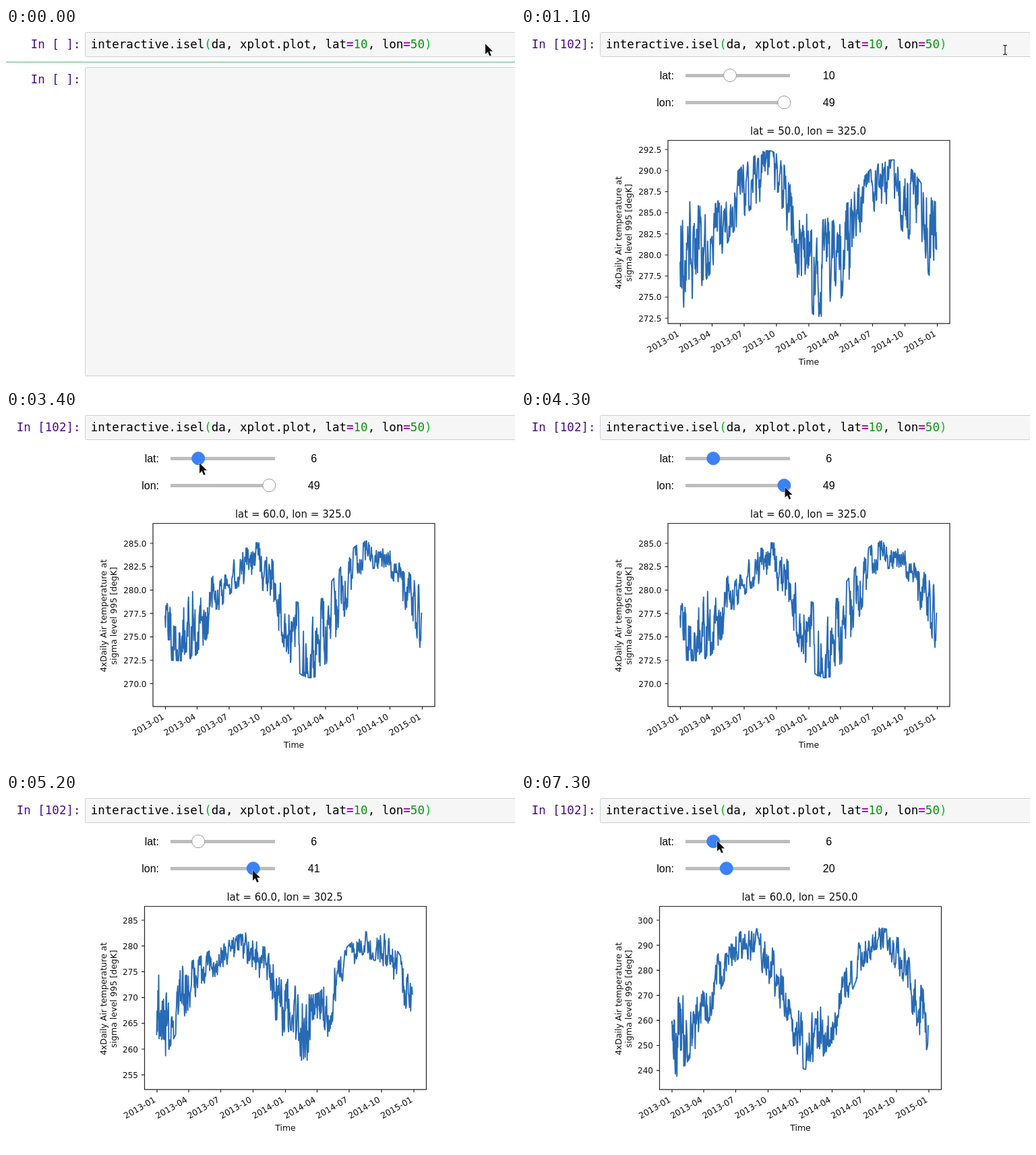
An HTML page that plays this animation: 755x526 px, repeating every 8000 ms.

```html
<!DOCTYPE html>
<html lang="en">
<head>
<meta charset="utf-8">
<title>Interactive plot</title>
<style>
  html, body { margin: 0; width: 100%; height: 100%; overflow: hidden; background: #fff; }
  svg { display: block; }
  text { font: 12.5px "DejaVu Sans", sans-serif; fill: #111; }
  .code text { font: 17.5px "DejaVu Sans Mono", monospace; fill: #000; }
  .code .prompt { fill: #480a8c; }
  .br { fill: #0b2; }
  .op { fill: #a814c8; font-weight: bold; }
  .num { fill: #0a940f; }
  .cell { fill: #f6f6f6; stroke: #cfcfcf; }
  .slider text { font: 16px "Liberation Sans", Arial, sans-serif; fill: #000; }
  .plot text.title { font-size: 15px; }
  .plot text.tick { font-size: 12px; }
  .axes { fill: none; stroke: #222; stroke-width: 1.2; }
  .data { fill: none; stroke: #276ab5; stroke-width: 1.9; stroke-linejoin: round; }
  .end { text-anchor: end; }
  .mid { text-anchor: middle; }
</style>
</head>
<body>
<svg width="755" height="526" viewBox="0 0 755 526">
  <g class="code">
    <rect class="cell" x="117.5" y="6.5" width="660" height="36" rx="2"/>
    <text id="prompt" class="prompt end" x="110.5" y="30"></text>
    <text x="125.7" y="30">interactive.isel<tspan class="br">(</tspan>da, xplot.plot, lat<tspan class="op">=</tspan><tspan class="num">10</tspan>, lon<tspan class="op">=</tspan><tspan class="num">50</tspan><tspan class="br">)</tspan></text>
    <path id="caret" d="M631.5 14V34" stroke="#000"/>
    <g id="next">
      <path d="M0 50.5H755" stroke="#4fb873"/>
      <rect class="cell" x="117.5" y="58.5" width="660" height="457" rx="2"/>
      <text class="prompt end" x="110.5" y="82">In [ ]:</text>
    </g>
  </g>
  <g id="plots"></g>
  <g id="sliders"></g>
  <path id="beam" d="M715 25.5h2l1 1 1-1h2M718 26V39M715 39.5h2l1-1 1 1h2" fill="none" stroke="#222" stroke-width="1.2"/>
  <path id="arrow" d="M0 0V15.2L3.6 12L6.2 18L8.8 16.9L6.3 11.1H11Z" fill="#111" stroke="#fff" paint-order="stroke"/>
</svg>
<script>
const $ = id => document.getElementById(id);
const show = (el, on) => el.style.display = on ? '' : 'none';
const clamp = (v, lo, hi) => Math.max(lo, Math.min(hi, v));
const WIDTH = 381, TOP = 166.5, BOTTOM = 437.8, DAYS = 730;

function seeded(seed) {
  return () => {
    seed = (seed * 1664525 + 1013904223) % 4294967296;
    return seed / 4294967296;
  };
}

// Catmull-Rom curve through evenly spaced values, k from 0 to 1
function curve(values, k) {
  const last = values.length - 1, s = k * last;
  const i = Math.min(last - 1, Math.floor(s)), u = s - i;
  const [a, b, c, d] = [-1, 0, 1, 2].map(o => values[clamp(i + o, 0, last)]);
  return b + u / 2 * (c - a + u * (2 * a - 5 * b + 4 * c - d + u * (3 * (b - c) + d - a)));
}

// Drifting noise between an upper and a lower quarterly curve
function series(x0, hi, lo, seed) {
  const rnd = seeded(seed), points = [];
  let drift = 0;
  for (let x = 0; x <= WIDTH; x += .6) {
    const a = curve(hi, x / WIDTH), b = curve(lo, x / WIDTH);
    drift = drift * .8 + (rnd() - .5) * 1.6;
    const u = clamp(drift * .9 + Math.sin(rnd() * 2 * Math.PI) * .5, -1.1, 1.1);
    points.push(`${(x0 + x).toFixed(1)} ${((a + b + (b - a) * u) / 2).toFixed(1)}`);
  }
  return 'M' + points.join('L');
}

// ticks: first value, value step, first y, y step, count, decimals
function addPlot(left, title, ticks, hi, lo) {
  const [value, dv, y0, dy, count, digits] = ticks;
  const x0 = left + 18, centre = left + 209;
  let marks = '', labels = '';
  for (let i = 0; i < count; i++) {
    const y = y0 + i * dy;
    marks += `M${left} ${y}h-4.5`;
    labels += `<text class="tick end" x="${left - 9.5}" y="${y + 4.6}">${(value - i * dv).toFixed(digits)}</text>`;
  }
  for (let i = 0; i < 9; i++) {
    const date = new Date(Date.UTC(2013, i * 3));
    const x = x0 + (date - Date.UTC(2013)) / 864e5 / DAYS * WIDTH;
    marks += `M${x + .5} ${BOTTOM}v4.5`;
    labels += `<text class="end" transform="translate(${x - .5} 455.5) rotate(-30)">${date.toISOString().slice(0, 7)}</text>`;
  }
  $('plots').insertAdjacentHTML('beforeend', `<g class="plot">
    <path class="data" d="${series(x0, hi, lo, left + value)}"/>
    <path class="axes" d="M${left} ${TOP}h418V${BOTTOM}h-418Z${marks}"/>${labels}
    <text class="title mid" x="${centre - 1}" y="158.3">${title}</text>
    <text class="mid" x="${centre}" y="498.5">Time</text>
    <text class="mid" transform="translate(149 303.5) rotate(-90)">4xDaily Air temperature at</text>
    <text class="mid" transform="translate(164 303.5) rotate(-90)">sigma level 995 [degK]</text></g>`);
}

addPlot(218, 'lat = 50.0, lon = 325.0', [292.5, 2.5, 180, 31.25, 9, 1],
  [260, 268, 205, 190, 285, 275, 210, 205, 265],
  [410, 355, 275, 260, 410, 395, 275, 300, 375]);
addPlot(218, 'lat = 60.0, lon = 325.0', [285, 2.5, 196, 34.65, 7, 1],
  [275, 265, 228, 200, 285, 268, 200, 205, 265],
  [365, 355, 270, 260, 375, 375, 250, 242, 350]);
addPlot(205.5, 'lat = 60.0, lon = 302.5', [285, 5, 187, 38.2, 7, 0],
  [260, 252, 225, 210, 275, 300, 225, 205, 268],
  [400, 315, 262, 255, 360, 390, 262, 250, 330]);
addPlot(205.5, 'lat = 60.0, lon = 250.0', [300, 10, 187, 37.1, 7, 0],
  [310, 278, 198, 220, 325, 300, 212, 212, 305],
  [420, 350, 245, 275, 400, 365, 252, 258, 385]);

// A slider whose value v stands at x = zero + v * unit
function addSlider(name, y, zero, unit) {
  $('sliders').insertAdjacentHTML('beforeend', `<g class="slider">
    <text class="end" x="227" y="${y + 6}">${name}:</text>
    <rect x="244" y="${y - 2}" width="155" height="5" rx="1" fill="#bdbdbd"/>
    <circle cy="${y + .2}"/><text class="mid" x="456.7" y="${y + 6}"></text></g>`);
  const g = $('sliders').lastElementChild;
  const handle = g.querySelector('circle'), label = g.lastElementChild;
  return (pointerX, active, pressed) => {
    const value = Math.round((pointerX - zero) / unit);
    label.textContent = value;
    handle.setAttribute('cx', zero + value * unit);
    handle.setAttribute('r', pressed ? 11.5 : 9.5);
    handle.setAttribute('fill', active ? '#3b82f6' : '#fff');
    handle.setAttribute('stroke', active ? '#3b82f6' : '#9a9a9a');
  };
}
const setLat = addSlider('lat', 70, 248, 6.2), setLon = addSlider('lon', 110, 245.8, 2.95);

// Pointer moves: start, end, target x, target y
const moves = [
  [1700, 1900, 341, 85], [2100, 2300, 320, 79], [2500, 2600, 312.5, 77], [2700, 2800, 300, 77],
  [2900, 3100, 287, 77], [3700, 4300, 391.5, 113], [4500, 4700, 367, 113], [4800, 4900, 366, 113],
  [5500, 5900, 308, 113], [6300, 6400, 306, 113], [6800, 7300, 291, 69.5]];

function pointer(t) {
  let x = 711, y = 23.5;
  for (const [start, end, tx, ty] of moves) {
    const k = clamp((t - start) / (end - start), 0, 1);
    x += (tx - x) * k;
    y += (ty - y) * k;
  }
  return [x, y];
}

const plotStarts = [1100, 3400, 5200, 6600];

function draw(now) {
  // The screen updates ten times a second
  const t = Math.floor(now % 8000 / 100) * 100;
  const within = (a, b) => t >= a && t < b;
  const dragX = (a, b) => pointer(clamp(t, a, b))[0];

  $('prompt').textContent = `In [${t < 800 ? ' ' : t < 1100 ? '*' : 102}]:`;
  show($('caret'), within(400, 800));
  show($('next'), t < 1100);
  $('next').setAttribute('transform', `translate(0 ${t < 900 ? 0 : 85})`);
  show($('sliders'), t >= 900);
  const current = plotStarts.filter(s => s <= t).length - 1;
  [...$('plots').children].forEach((p, i) => show(p, i === current));

  setLat(dragX(2600, 3200), within(2200, 4400) || t >= 7300, within(2800, 3200));
  setLon(dragX(4300, 6400), t >= 4300, within(4400, 4900) || within(5600, 6400));

  const overText = within(400, 1800);
  show($('beam'), overText);
  show($('arrow'), !overText);
  $('arrow').setAttribute('transform', `translate(${pointer(t)})`);
}

const start = performance.now();
function loop() {
  draw(performance.now() - start);
  requestAnimationFrame(loop);
}
loop();
</script>
</body>
</html>
```
